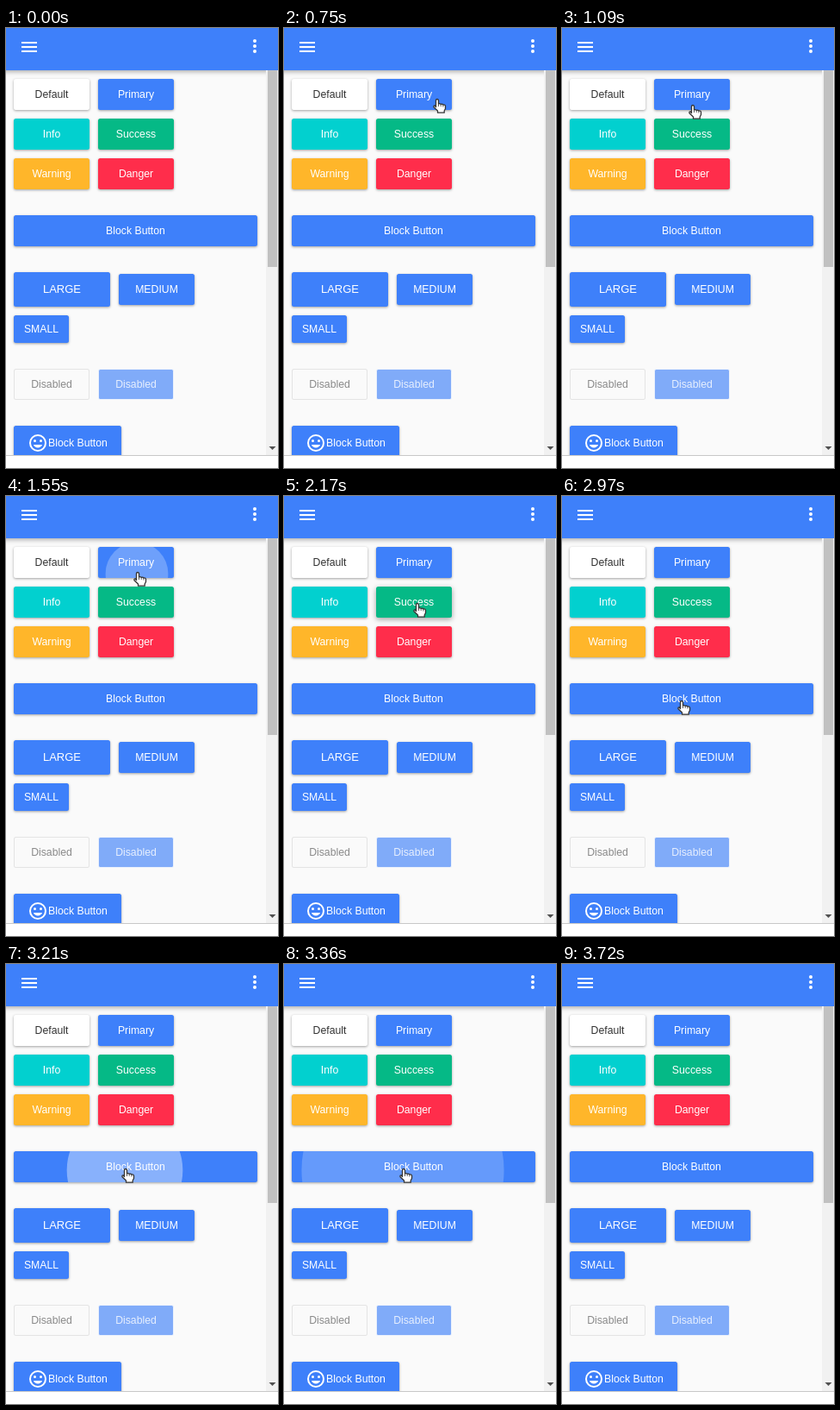
An HTML page with a canvas for the animation above (4710 ms loop, 316x510 px).

```html
<!DOCTYPE html>
<html lang="en">
<head>
<meta charset="utf-8">
<title>Buttons</title>
<style>
html, body { margin: 0; width: 100%; height: 100%; overflow: hidden; background: #fff; }
canvas { display: block; }
</style>
</head>
<body>
<canvas id="stage" width="316" height="510"></canvas>
<script>
const ctx = document.getElementById('stage').getContext('2d');
const LOOP = 4710;
const BLUE = '#3e80fa', PAGE = '#fafafa';

const button = (label, x, y, w, h, fill, extra) =>
  ({ label, x, y, w, h, fill, ink: '#fff', size: 12.25, ...extra });

const buttons = [
  button('Default', 9, 59, 88, 36, '#fff', { ink: '#333' }),
  button('Primary', 107, 59, 88, 36, BLUE),
  button('Info', 9, 105, 88, 36, '#02d0cf'),
  button('Success', 107, 105, 88, 36, '#05b986'),
  button('Warning', 9, 151, 88, 36, '#ffb62a'),
  button('Danger', 107, 151, 88, 36, '#ff2d4b'),
  button('Block Button', 9, 217, 283, 36, BLUE),
  button('LARGE', 9, 283, 112, 40, BLUE, { size: 13 }),
  button('MEDIUM', 131, 285, 88, 36, BLUE),
  button('SMALL', 9, 333, 64, 32, BLUE),
  button('Disabled', 9, 395, 88, 36, PAGE, { ink: '#8a8a8a', border: '#e4e4e4' }),
  button('Disabled', 107, 395, 88, 36, '#80abf9', { ink: '#e6effe', border: '#e9f0fc' }),
  button('Block Button', 9, 461, 125, 40, BLUE, { textX: 83.5, textY: 481 })
];

// Growth in px/ms; the fade runs between two ages in ms.
const ripples = [
  { label: 'Primary', start: 1300, x: 152, y: 90, speed: .145, fade: [100, 490] },
  { label: 'Success', start: 2165, x: 155, y: 126, speed: .16, fade: [260, 550] },
  { label: 'Block Button', start: 3010, x: 138, y: 239, speed: .335, fade: [190, 510] }
];

// Pointer hotspot: time, x, y
const route = [
  [750, 178, 82], [930, 117, 92], [1090, 152, 89], [1320, 152, 89], [1550, 153, 88],
  [1650, 153, 89], [1800, 155, 102], [1950, 155, 124], [2290, 155, 124],
  [2580, 144, 195], [2680, 141, 215], [2900, 139, 237], [3720, 139, 237]
];

const hand = new Path2D('M3.5 9.5V2a1.5 1.5 0 0 1 3 0V6q1.4-1 2.7.4q1.5-.8 2.7.6q2-.6 2.6 1.2V11.5L13.2 14V16.2H5.5V14L1 9.7Q.6 7.6 2.4 8Z');
const arrow = new Path2D('M.5.8V17L4.2 13.6L7 19.5L9.6 18.3L6.9 12.6H12.2Z');
const smile = new Path2D('M0 5.5c2.33 0 4.31-1.46 5.11-3.5H-5.11c.8 2.04 2.78 3.5 5.11 3.5z');

const clamp = v => Math.min(1, Math.max(0, v));

function rect(x, y, w, h, fill) {
  ctx.fillStyle = fill;
  ctx.fillRect(x, y, w, h);
}

function disc(x, y, r, fill) {
  ctx.fillStyle = fill;
  ctx.beginPath();
  ctx.arc(x, y, r, 0, Math.PI * 2);
  ctx.fill();
}

function shadow(alpha, dy, blur) {
  ctx.shadowColor = `rgba(0,0,0,${alpha})`;
  ctx.shadowOffsetY = dy;
  ctx.shadowBlur = blur;
}

function drawButton(b, t) {
  const wave = ripples.find(r => r.label === b.label && b.y < 300);
  const age = wave ? t - wave.start : -1;
  const raise = age >= 0 ? clamp(1 - age / 190) : 0;

  ctx.save();
  ctx.beginPath();
  ctx.roundRect(b.x, b.y, b.w, b.h, 2.5);
  ctx.fillStyle = b.border || b.fill;
  if (!b.border) shadow(.36, 1 + raise, 3 + 3 * raise);
  ctx.fill();
  shadow(0, 0, 0);
  if (b.border) {
    ctx.beginPath();
    ctx.roundRect(b.x + 1, b.y + 1, b.w - 2, b.h - 2, 1.5);
    ctx.fillStyle = b.fill;
    ctx.fill();
  }
  if (age >= 0) {
    const [from, to] = wave.fade;
    const alpha = .4 * (1 - clamp((age - from) / (to - from)));
    ctx.clip();
    disc(wave.x, wave.y, age * wave.speed, `rgba(255,255,255,${alpha})`);
  }
  ctx.restore();

  ctx.font = `${b.size}px "Liberation Sans", Arial, sans-serif`;
  ctx.textAlign = 'center';
  ctx.fillStyle = b.ink;
  ctx.fillText(b.label, b.textX || b.x + b.w / 2, (b.textY || b.y + b.h / 2) + 4);
}

function drawSmiley(x, y) {
  ctx.save();
  ctx.translate(x, y);
  ctx.strokeStyle = '#fff';
  ctx.lineWidth = 2;
  ctx.beginPath();
  ctx.arc(0, 0, 9, 0, Math.PI * 2);
  ctx.stroke();
  disc(-3.5, -2.5, 1.5, '#fff');
  disc(3.5, -2.5, 1.5, '#fff');
  ctx.fill(smile);
  ctx.restore();
}

function drawPage(t) {
  ctx.save();
  ctx.beginPath();
  ctx.rect(0, 0, 316, 495);
  ctx.clip();
  rect(0, 0, 316, 495, PAGE);
  buttons.forEach(b => drawButton(b, t));
  drawSmiley(37, 481);
  ctx.restore();
}

function drawHeader() {
  ctx.save();
  shadow(.3, 2, 5);
  rect(-10, -10, 336, 59, BLUE);
  ctx.restore();
  for (const y of [16, 21, 26]) rect(18, y, 18, 2, '#fff');
  for (const y of [15, 21, 27]) disc(289, y, 2, '#fff');
}

function drawScrollbar(t) {
  rect(302, 49, 14, 446, '#f1f1f1');
  rect(304, 49, 11, 228, t >= 440 && t < 520 ? '#a8a8a8' : '#c1c1c1');
  ctx.fillStyle = '#505050';
  ctx.fill(new Path2D('M305.5 485H313.5L309.5 489Z'));
}

function drawPointer(t) {
  const i = route.findIndex(p => p[0] > t);
  if (i < 1) return;
  const [t0, x0, y0] = route[i - 1], [t1, x1, y1] = route[i];
  const k = (t - t0) / (t1 - t0);
  const x = x0 + (x1 - x0) * k, y = y0 + (y1 - y0) * k;
  const over = buttons.some(b => x >= b.x && x < b.x + b.w && y >= b.y && y < b.y + b.h);
  const shape = over ? hand : arrow;

  ctx.save();
  ctx.translate(Math.round(x) - (over ? 5 : 0), Math.round(y));
  ctx.lineJoin = 'round';
  ctx.lineWidth = 1.3;
  ctx.strokeStyle = '#333';
  ctx.fillStyle = '#fff';
  ctx.fill(shape);
  ctx.stroke(shape);
  if (over) {
    ctx.lineWidth = .8;
    ctx.stroke(new Path2D('M6.5 6V9M9.2 6.5V9M11.9 7V9.5'));
  }
  ctx.restore();
}

const origin = performance.now();

function frame() {
  const t = (performance.now() - origin) % LOOP;
  rect(0, 0, 316, 510, '#fff');
  drawPage(t);
  drawHeader();
  drawScrollbar(t);
  rect(0, 495, 316, 1, '#c8c8c8');
  drawPointer(t);
  requestAnimationFrame(frame);
}
frame();
</script>
</body>
</html>
```
